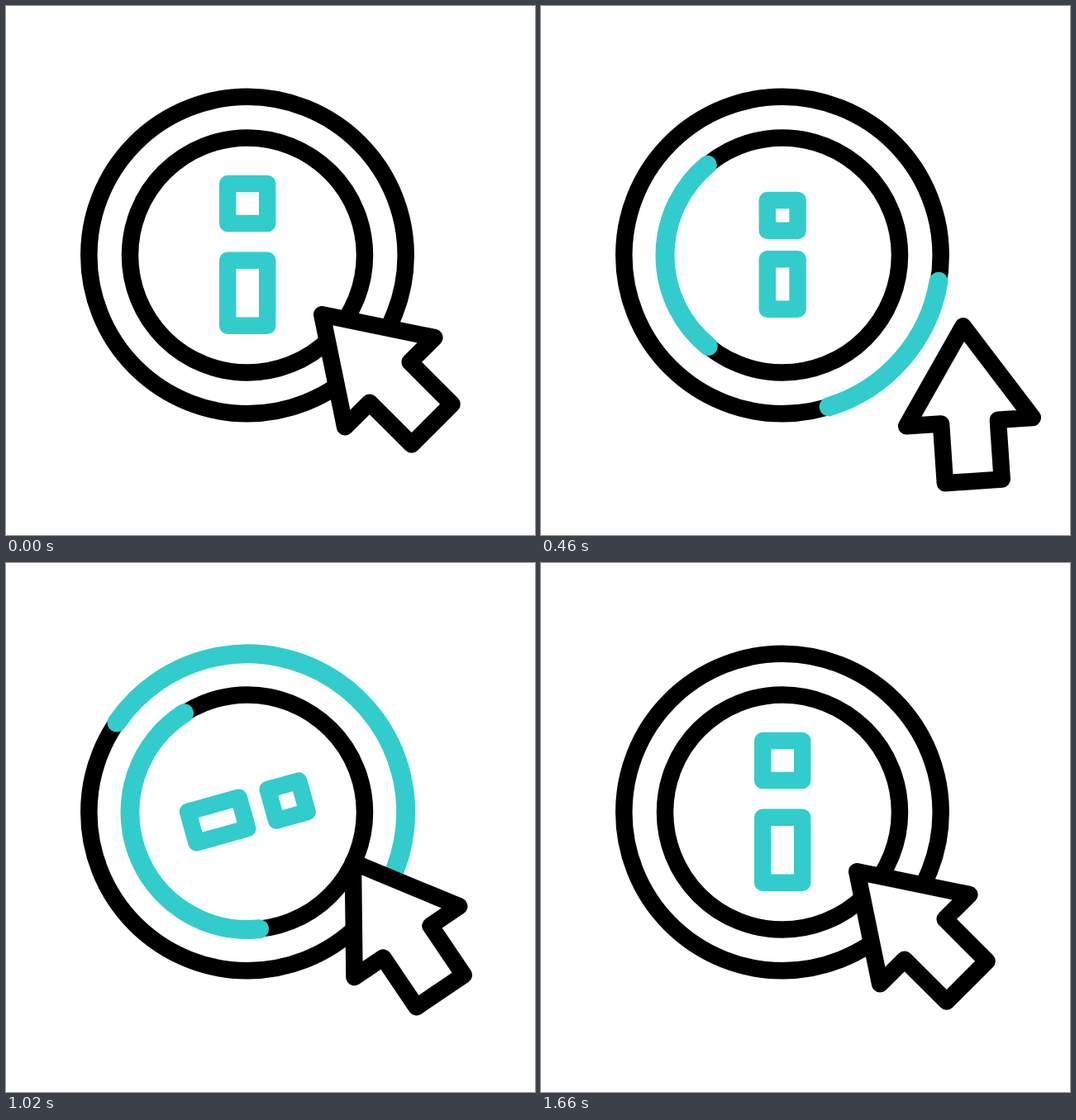
These frames come from a looping animation (640 px wide and 640 px high, 2020 ms). An HTML page:

```html
<!DOCTYPE html>
<html lang="en">
<head>
<meta charset="utf-8">
<title>Info click</title>
<style>
  html, body { margin: 0; width: 100%; height: 100%; overflow: hidden; background: #fff; }
  svg { display: block; width: 100%; height: 100%; }
  svg * { stroke-linecap: round; stroke-linejoin: round; }
</style>
</head>
<body>
<svg viewBox="0 0 640 640" fill="none" stroke="#000" stroke-width="20.5">
  <circle cx="292" cy="301.5" r="191.7"/>
  <circle cx="292" cy="301.5" r="142"/>
  <g stroke="#33cccc">
    <path id="outer" stroke-width="23"/>
    <path id="inner" stroke-width="23"/>
    <g id="info">
      <rect x="-24" y="-86" width="48" height="48"/>
      <rect x="-24" y="6.7" width="48" height="79"/>
    </g>
  </g>
  <path id="cursor" fill="#fff" d="M0-94L76.5 22H34.5V94H-34.5V22H-76.5Z"/>
</svg>
<script>
const LOOP = 2020, STEP = 20;
const CENTER = { x: 292, y: 301.5 };
const $ = id => document.getElementById(id);
const mix = (a, b, f) => a + (b - a) * f;
const progress = (t, from, to) => Math.min(1, Math.max(0, (t - from) / (to - from)));
const smooth = x => x * x * (3 - 2 * x);
const easeOut = x => 1 - (1 - x) ** 2;

// Cubic easing with horizontal handles at x1 and x2.
function bezier(x, x1, x2) {
  let lo = 0, hi = 1;
  for (let i = 0; i < 24; i++) {
    const p = (lo + hi) / 2, q = 1 - p;
    if (3 * p * q * q * x1 + 3 * p * p * q * x2 + p ** 3 < x) lo = p; else hi = p;
  }
  return smooth(lo);
}

function point(r, deg) {
  const a = deg * Math.PI / 180;
  return `${CENTER.x + r * Math.sin(a)} ${CENTER.y - r * Math.cos(a)}`;
}

// The arc grows to a half turn counter-clockwise, then swings back while shrinking.
function drawArc(id, r, origin, t) {
  const grow = progress(t, 0, 850), back = smooth(progress(t, 850, 1550));
  const length = 180 * (smooth(grow) - back);
  const tail = origin - 72 * mix(grow, smooth(grow), 0.5) + 266 * back;
  const d = length < 0.2 ? "" : `M${point(r, tail)}A${r} ${r} 0 0 0 ${point(r, tail - length)}`;
  $(id).setAttribute("d", d);
}

function drawInfo(t) {
  const scale = 1 - 0.255 * (smooth(progress(t, 0, 560)) - smooth(progress(t, 800, 1460)));
  const turn = -360 * bezier(progress(t, 560, 1392), 0.37, 0.3);
  $("info").setAttribute("transform", `translate(292.2 301) rotate(${turn}) scale(${scale})`);
  $("info").setAttribute("stroke-width", 20.5 / scale);
}

const REST = { x: 448.7, y: 439.7, turn: -45 };
const AWAY = { x: 520.3, y: 487.5, turn: 0 };
const PRESS = { x: 432, y: 422.6, turn: -56.5 };
const legs = [
  { from: REST, to: AWAY, start: 0, end: 650, ease: easeOut, bend: { x: 36, y: -29 } },
  { from: AWAY, to: PRESS, start: 650, end: 1300, ease: smooth, bend: { x: 23, y: -35 } },
  { from: PRESS, to: REST, start: 1300, end: 1640, ease: smooth, bend: { x: 0, y: 0 } }
];

function drawCursor(t) {
  const { from, to, start, end, ease, bend } = legs.find(leg => t < leg.end) || legs[2];
  const f = ease(progress(t, start, end)), bow = f * (1 - f);
  const x = mix(from.x, to.x, f) + bend.x * bow;
  const y = mix(from.y, to.y, f) + bend.y * bow;
  $("cursor").setAttribute("transform", `translate(${x} ${y}) rotate(${mix(from.turn, to.turn, f)})`);
}

function render(t) {
  drawArc("inner", 142, 0, t);
  drawArc("outer", 191.7, 190, t - 120);
  drawInfo(t);
  drawCursor(t);
}

const begin = performance.now();
function tick() {
  const t = (performance.now() - begin) % LOOP;
  render(Math.floor(t / STEP) * STEP);
  requestAnimationFrame(tick);
}
tick();
</script>
</body>
</html>
```
